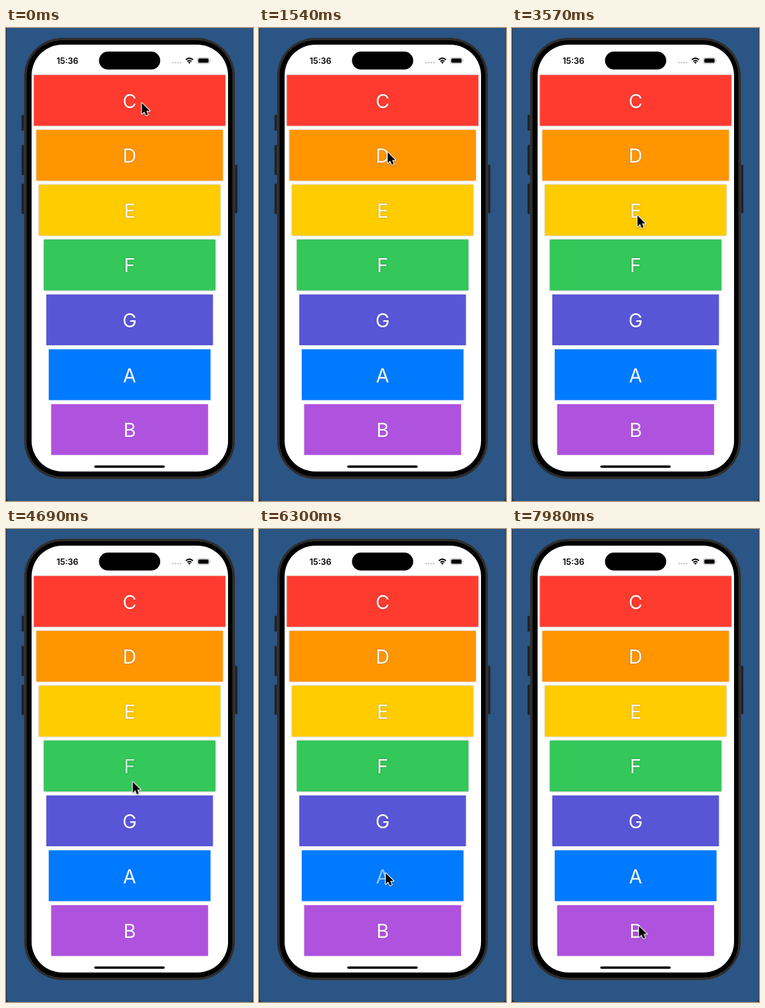
Write an HTML page that moves like this. It is 386 px wide and 738 px high and loops after 8 s.

```html
<!DOCTYPE html>
<html lang="en">
<head>
<meta charset="utf-8">
<title>Xylophone</title>
<style>
  html, body { margin: 0; width: 100%; height: 100%; overflow: hidden; background: #23303c; }
  svg { display: block; width: 100%; height: 100%; }
  text { font-family: Inter, Roboto, sans-serif; }
  .note { font-size: 30px; fill: #fafafa; text-anchor: middle; }
  .clock { font-size: 13px; font-weight: 600; }
  .button { fill: #1c2127; stroke: #343a40; stroke-width: .6; }
</style>
</head>
<body>
<svg viewBox="0 0 386 738">
  <rect width="386" height="738" fill="#23303c"/>
  <path d="M1 0H385.4V732Q385.4 738 379.4 738H7Q1 738 1 732Z" fill="#2b5585"/>

  <g class="button">
    <rect x="24.3" y="135.5" width="5" height="24.5" rx="1.5"/>
    <rect x="24.3" y="182.5" width="5" height="47" rx="1.5"/>
    <rect x="24.3" y="243" width="5" height="47" rx="1.5"/>
    <rect x="356.5" y="213.5" width="5" height="75.5" rx="1.5"/>
  </g>
  <rect x="28.5" y="15.5" width="329" height="688" rx="59" fill="#292a2c" stroke="#3b3d40"/>
  <rect x="31.5" y="18.5" width="323" height="682" rx="56" fill="#000" stroke="#45423f" stroke-width=".8"/>
  <rect x="40" y="26" width="307" height="666" rx="48" fill="#fff"/>

  <rect x="145.3" y="36.8" width="95.7" height="28" rx="14"/>
  <text class="clock" x="79" y="55.8">15:36</text>
  <g fill="#c3c3c5">
    <circle cx="261" cy="54" r="1.3"/><circle cx="265" cy="54" r="1.3"/>
    <circle cx="269" cy="54" r="1.3"/><circle cx="273" cy="54" r="1.3"/>
  </g>
  <g fill="none" stroke="#000" stroke-width="2">
    <path d="M281 49.5Q286.6 44.7 292.2 49.5"/>
    <path d="M283.3 52.1Q286.6 49.3 289.9 52.1"/>
  </g>
  <path d="M284.5 53.6Q286.6 52 288.7 53.6L286.6 55.8Z"/>
  <rect x="299" y="46.2" width="19" height="9.4" rx="3" fill="#fff" stroke="#aaa" stroke-width=".8"/>
  <rect x="300.4" y="47.5" width="16.2" height="6.8" rx="1.9"/>
  <path d="M319.4 49.3Q321 50.9 319.4 52.5Z" fill="#aaa"/>

  <g id="bars"></g>
  <rect x="138" y="682.4" width="110" height="3.8" rx="1.9"/>

  <path id="cursor" d="M0 0V17L4 13.3L6.6 19.4L9.6 18.1L7.1 12.2H12.3Z"
    stroke="#fff" stroke-width="2.4" stroke-linejoin="round" paint-order="stroke"
    style="filter: drop-shadow(0 1px 1px rgba(0,0,0,.3))"/>
</svg>
<script>
const DURATION = 8000;
const loop = { duration: DURATION, iterations: Infinity };
const bars = document.getElementById("bars");

// name, colour, left inset, shadow strength, press time, release time
const notes = [
  ["C", "#ff3b30", 43.6, .25, 330, 430],
  ["D", "#ff9500", 47.5, .25, 1240, 1340],
  ["E", "#ffcc00", 51.5, .3, 3080, 3180],
  ["F", "#34c759", 59.2, .36, 4480, 4590],
  ["G", "#5856d6", 63, .08, 5560, 5670],
  ["A", "#007aff", 66.8, .08, 6220, 6320],
  ["B", "#af52de", 70.6, .08, 6690, 6780]
];

function add(tag, attributes) {
  const node = document.createElementNS("http://www.w3.org/2000/svg", tag);
  for (const key in attributes) node.setAttribute(key, attributes[key]);
  return bars.appendChild(node);
}

notes.forEach(([name, fill, x, shade, press, release], i) => {
  const y = 73.3 + i * 85.6;
  const bar = add("rect", { x, y, width: 386.4 - 2 * x, height: 79.3, fill });
  const label = add("text", { class: "note", x: 193.2, y: y + 51.2 });
  label.textContent = name;
  bar.style.filter = `blur(.35px) drop-shadow(.6px .6px 1.4px rgba(0,0,0,${shade}))`;
  label.style.filter = `blur(.3px) drop-shadow(.9px .9px .9px rgba(0,0,0,${shade}))`;
  const steps = [[0, 1], [press, 1], [press + 30, .58], [release, .58], [release + 240, 1], [DURATION, 1]];
  label.animate(steps.map(([t, opacity]) => ({ offset: t / DURATION, opacity })), loop);
});

// time, x, y of the pointer tip
const path = [
  [0, 212.3, 117], [650, 210, 118], [1150, 201, 193], [1700, 201, 194],
  [2500, 197, 289], [3650, 196, 292.6], [4250, 198, 392], [4780, 198, 394.6],
  [5250, 197.2, 450], [5720, 197.2, 450.6], [6080, 198, 535], [6340, 198, 537],
  [6620, 198.4, 622], [7100, 198.4, 622.6], [7700, 198.4, 619.6], [DURATION, 198.4, 619.6]
];
document.getElementById("cursor").animate(path.map(([t, x, y]) => ({
  offset: t / DURATION,
  transform: `translate(${x}px, ${y}px)`,
  easing: "ease-in-out"
})), loop);
</script>
</body>
</html>
```
